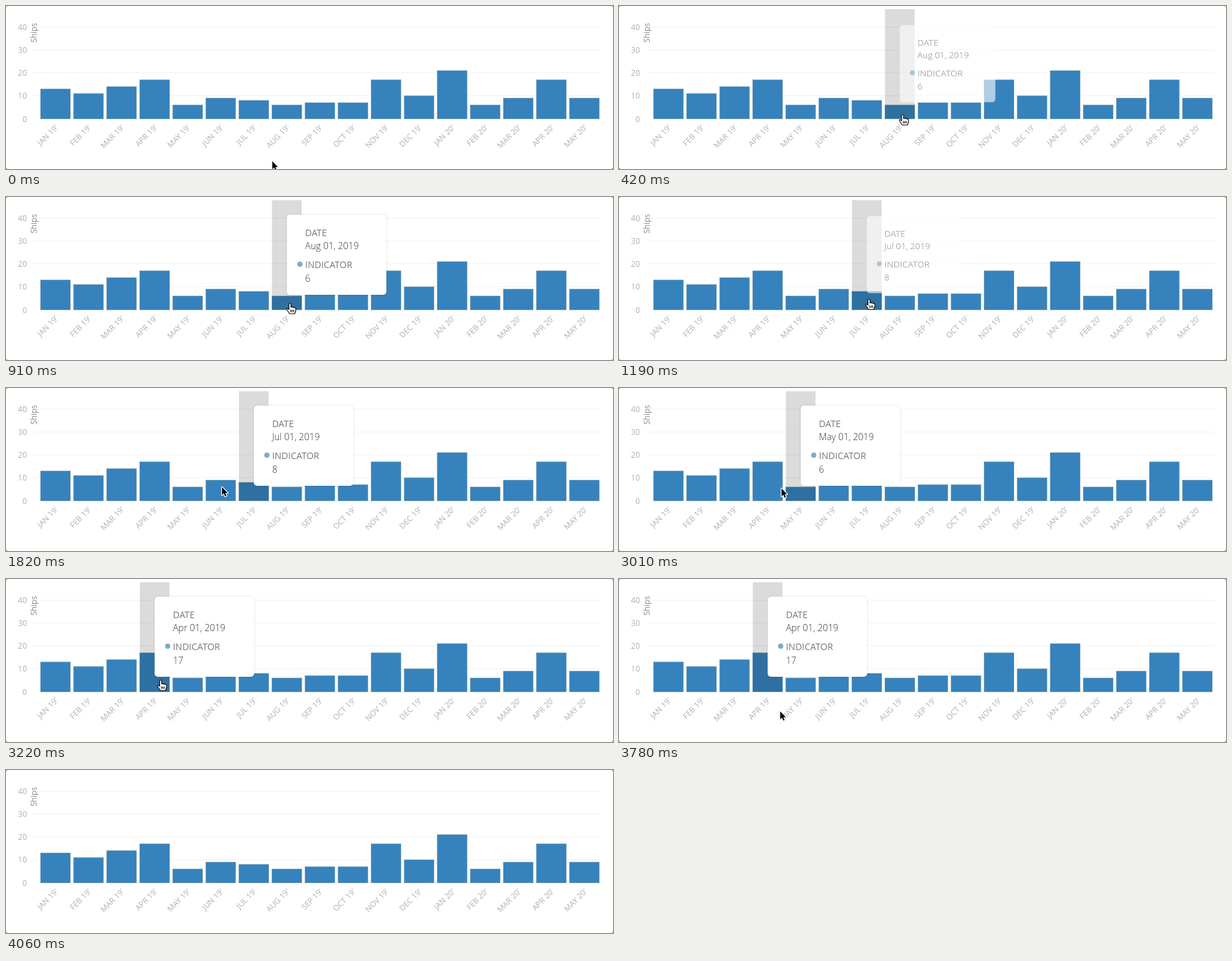
An HTML page with a canvas for the animation above (4.34 s loop, 930 px wide and 250 px high).

```html
<!DOCTYPE html>
<html lang="en">
<head>
<meta charset="utf-8">
<title>Ships per month</title>
<style>
  html, body { margin: 0; width: 100%; height: 100%; overflow: hidden; background: #fff; }
  canvas { display: block; width: 930px; height: 250px; }
</style>
</head>
<body>
<canvas id="stage" width="930" height="250"></canvas>
<script>
const ctx = document.getElementById('stage').getContext('2d');
const LOOP = 4340, STEP = 70;
const BASE = 173, UNIT = 3.515, PITCH = 50.65, BAR_W = 45.5;
const FONT = '"Open Sans", "Noto Sans", sans-serif';

const names = ['Jan', 'Feb', 'Mar', 'Apr', 'May', 'Jun', 'Jul', 'Aug', 'Sep', 'Oct', 'Nov', 'Dec'];
const values = [13, 11, 14, 17, 6, 9, 8, 6, 7, 7, 17, 10, 21, 6, 9, 17, 9];

// Hovered month with the times its band is switched on and off
const hovers = [
  { month: 7, on: 420, off: 1120 },
  { month: 6, on: 1190, off: 1960 },
  { month: 5, on: 2030, off: 2450 },
  { month: 4, on: 2520, off: 3080 },
  { month: 3, on: 3150, off: 3920 }
];

// Pointer path: time, x, y
const path = [
  [0, 408, 238], [350, 433, 170], [490, 436, 163],
  [770, 436, 163], [910, 435, 163], [1120, 385, 157], [1260, 381, 156],
  [1540, 381, 156], [1820, 331, 152], [1960, 325, 152],
  [2100, 325, 152], [2450, 286, 152], [2590, 280, 152],
  [2660, 280, 152], [3010, 249, 154], [3150, 237, 155],
  [3570, 237, 155], [3780, 247, 203]
];
const POINTER_GONE = 3850;

const barX = i => 53 + i * PITCH;

function text(str, x, y, size, color, align = 'left', weight = 400) {
  ctx.font = `${weight} ${size}px ${FONT}`;
  ctx.textAlign = align;
  ctx.fillStyle = color;
  ctx.fillText(str, x, y);
}

function rotatedText(str, x, y, angle, color, align) {
  ctx.save();
  ctx.translate(x, y);
  ctx.rotate(angle);
  text(str, 0, 0, 12, color, align);
  ctx.restore();
}

function roundRect(x, y, w, h, r) {
  ctx.beginPath();
  ctx.roundRect(x, y, w, h, r);
  ctx.fill();
}

function drawChart() {
  ctx.fillStyle = '#777';
  ctx.fillRect(0, 0, 930, 250);
  ctx.fillStyle = '#fff';
  roundRect(0, 0, 930, 250, 3);

  for (let v = 0; v <= 40; v += 10) {
    const y = Math.floor(BASE - v * UNIT);
    ctx.fillStyle = '#f2f2f2';
    if (v) ctx.fillRect(42, y, 870, 1);
    text(v, 32, y + 4.5, 12, '#b0b0b0', 'right');
  }
  rotatedText('Ships', 47, 56, -Math.PI / 2, '#888', 'left');

  ctx.lineWidth = 1;
  values.forEach((v, i) => {
    const x = barX(i), top = BASE - v * UNIT;
    ctx.fillStyle = '#3682bd';
    ctx.fillRect(x, top, BAR_W, BASE - top);
    ctx.strokeStyle = 'rgba(70,125,145,.5)';
    ctx.strokeRect(x, top, BAR_W, BASE - top);
    const label = `${names[i % 12].toUpperCase()} ${i < 12 ? 19 : 20}'`;
    rotatedText(label, x + BAR_W / 2 + 5, 187, -Math.PI / 4, '#b0b0b0', 'right');
  });
}

function drawBand(month) {
  ctx.fillStyle = 'rgba(0,0,0,.14)';
  ctx.fillRect(barX(month), 5, BAR_W, BASE - 5);
}

// Scales about the middle of its left edge
function drawTooltip(month, scale, alpha) {
  const w = 152.5, h = 123;
  ctx.save();
  ctx.globalAlpha = alpha;
  ctx.translate(barX(month) + BAR_W / 2, 27 + h / 2);
  ctx.scale(scale, scale);
  ctx.translate(0, -h / 2);
  ctx.save();
  if (alpha === 1) {
    ctx.shadowColor = 'rgba(0,0,0,.16)';
    ctx.shadowBlur = 3;
  }
  ctx.fillStyle = '#fff';
  roundRect(0, 0, w, h, 5);
  ctx.restore();
  text('DATE', 28, 32.5, 14, '#777');
  text(`${names[month]} 01, 2019`, 28, 53, 14, '#333', 'left', 300);
  text('INDICATOR', 28, 82, 14, '#777');
  text(values[month], 28, 102.5, 14, '#333', 'left', 300);
  ctx.fillStyle = '#7aabcf';
  ctx.beginPath();
  ctx.arc(20, 76, 4, 0, Math.PI * 2);
  ctx.fill();
  ctx.restore();
}

function drawHover(t) {
  for (const { month, on, off } of hovers) {
    if (t >= on && t < off) drawBand(month);
    if (t < on || t > off + STEP) continue;
    if (t === on) drawTooltip(month, 0.96, 0.6);
    else if (t < off) drawTooltip(month, 1, 1);
    else if (t === off) drawTooltip(month, 1.02, 1);
    else if (off === hovers.at(-1).off) drawTooltip(month, 0.96, 0.4);
  }
}

function pointerAt(t) {
  const n = path.findIndex(p => p[0] > t);
  if (n < 0) return path.at(-1).slice(1);
  const [t0, x0, y0] = path[n - 1], [t1, x1, y1] = path[n];
  const k = (t - t0) / (t1 - t0);
  return [x0 + (x1 - x0) * k, y0 + (y1 - y0) * k];
}

const arrow = new Path2D('M0 0V12.2L2.7 9.6L4.7 14.2L6.7 13.3L4.8 8.9H8.6Z');
const hand = new Path2D('M-1.5 1Q0 -1 1.5 1V6Q3 4.6 4.2 6.3Q5.6 5.2 6.8 7Q9 6 9 8.5V11L7.5 16H-.5L-4.5 10Q-5.5 7.5-3.5 7.8L-1.5 9.5Z');

function drawPointer(t) {
  if (t >= POINTER_GONE) return;
  const [x, y] = pointerAt(t);
  const onBar = hovers.some(h => t >= h.on && t < h.off &&
    x >= barX(h.month) && x <= barX(h.month) + BAR_W && y < BASE);
  ctx.save();
  ctx.translate(x, y);
  ctx.lineJoin = 'round';
  if (onBar) {
    ctx.fillStyle = '#fff';
    ctx.strokeStyle = '#111';
    ctx.lineWidth = 1.2;
    ctx.fill(hand);
    ctx.stroke(hand);
    ctx.beginPath();
    for (const lx of [1.2, 3.4, 5.6]) {
      ctx.moveTo(lx, 10);
      ctx.lineTo(lx, 13.5);
    }
    ctx.stroke();
  } else {
    ctx.strokeStyle = '#fff';
    ctx.lineWidth = 2.4;
    ctx.stroke(arrow);
    ctx.fillStyle = '#000';
    ctx.fill(arrow);
  }
  ctx.restore();
}

const start = performance.now();
function render(now) {
  const elapsed = Math.max(0, now - start) % LOOP;
  const t = Math.floor(elapsed / STEP) * STEP;
  drawChart();
  drawHover(t);
  drawPointer(t);
  requestAnimationFrame(render);
}
render(start);
</script>
</body>
</html>
```
